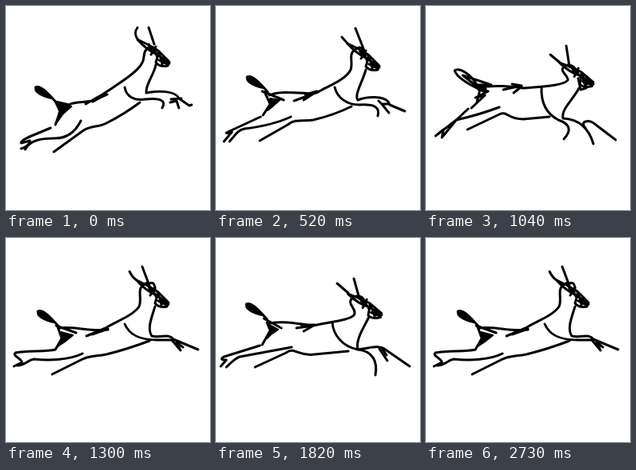
Recreate the animation shown at these times as an HTML page without scripts. Size 256 by 256 pixels, loop 2.86 s.

```html
<!DOCTYPE html>
<html lang="en">
<head>
<meta charset="utf-8">
<title>Leaping antelope</title>
<style>
  html, body { margin: 0; width: 100%; height: 100%; overflow: hidden; background: #fff; }
  svg { display: block; width: 100%; height: 100%; }
  .strip { fill: none; stroke: #000; stroke-width: 3; stroke-linecap: round; stroke-linejoin: round; }
  .solid { fill: #000; stroke-width: 2; }
</style>
</head>
<body>
<svg viewBox="0 0 256 256">
  <defs>
    <path id="head" d="M-23-18Q-12-5 2 1L17 12M-23-18Q-8-11 3-4L16 9M-9-12L-4-2M-6 1L0-9M-4-8L2 4 0 11Q5 17 15 15L17 10 6 5 8 13M3-2L8 9 14 13 4 8"/>
    <g id="tail">
      <path class="solid" d="M0 0C5-3 14 5 20 14C11 12-3 7 0 0Z"/>
      <path d="M0 0C5-3 14 5 26 19"/>
    </g>
  </defs>

  <!-- Poses sit side by side; the strip jumps to one at a time. -->
  <g class="strip">
    <animateTransform attributeName="transform" type="translate" dur="2.86s" repeatCount="indefinite" calcMode="discrete"
      values="-256;-1024;-1280;-1024;-768;-256;0;-768;-1536;-1280;-1024;-256;0;-768;-1280;-1024;-512;0;-512;-768;-1280;-1024"/>

    <!-- take-off -->
    <g>
      <use href="#head" x="187" y="60"/>
      <use href="#tail" x="38" y="98"/>
      <path d="M166 29C160 32 163 40 166 44M178 24L186 50M187 58Q186 50 180 50C170 55 175 64 172 69C167 80 144 92 124 104L95 118M62 116L80 120C88 113 108 112 118 106M105 115L122 105M103 116L118 108"/>
      <path class="solid" d="M64 119L79 122 71 131 64 141 66 130Z"/>
      <path d="M63 117L66 130 58 149C49 156 44 166 24 186M32 178L27 185M89 139C84 155 73 167 58 170C46 172 37 176 33 188M62 179L98 152C106 144 114 149 124 144Q148 131 168 116"/>
      <path d="M144 98C150 110 160 116 180 114L205 114M189 73C183 88 173 101 177 108C190 111 205 106 213 115L232 126Q237 126 235 123M203 116L215 128 204 121M210 116L216 122 222 134"/>
    </g>

    <!-- rising -->
    <g transform="translate(256)">
      <use href="#head" x="188" y="60"/>
      <use href="#tail" x="37" y="102"/>
      <path d="M165 27C160 34 163 39 166 43M179 27L186 48M188 58Q187 51 181 51C170 56 175 65 171 71C165 84 137 100 121 111L100 123M62 120L79 124C88 119 100 122 112 118L127 111M109 120L126 111 112 116"/>
      <path class="solid" d="M64 123L82 126 71 136 64 146 67 132Z"/>
      <path d="M63 122L68 132 62 149M56 153L32 163Q18 169 19 172L30 169Q29 176 19 179M94 144C87 158 76 166 62 166C45 166 30 168 24 180M60 183L96 157C107 149 115 153 126 147Q148 136 168 121"/>
      <path d="M149 102C151 114 161 119 175 117C192 115 202 118 196 128M188 74C185 88 175 98 176 109C190 106 213 106 217 116L230 125 233 124M206 121L214 119 217 128M220 116L207 117"/>
    </g>

    <!-- high stretch -->
    <g transform="translate(512)">
      <use href="#head" x="188" y="60"/>
      <use href="#tail" x="38" y="95"/>
      <path d="M164 29C158 32 163 39 166 44M178 26L187 55M188 58Q188 49 182 50C171 55 175 63 171 70C164 83 140 95 123 105L97 117M66 114C82 107 105 112 124 107M108 115L127 105 113 110M62 112L84 117"/>
      <path class="solid" d="M63 116L82 119 71 129 63 139 66 128Z"/>
      <path d="M66 128L58 143M54 144L16 162Q11 167 23 164L13 172M92 139C80 148 62 153 44 155C32 156 25 162 22 171M57 173L98 146C107 140 114 146 124 141Q148 129 170 117"/>
      <path d="M147 100C152 112 162 117 178 115L201 115M189 74C184 90 174 100 177 107C190 110 208 103 216 112L222 119 232 125Q238 125 235 122M202 121L203 116 218 128 206 120"/>
    </g>

    <!-- mid stretch -->
    <g transform="translate(768)">
      <use href="#head" x="188" y="65"/>
      <use href="#tail" x="39" y="89"/>
      <path d="M158 39L165 47M175 28L186 56M188 62Q186 52 180 52C163 58 173 68 169 80C163 92 144 99 128 108L98 119M67 112C80 106 100 109 123 110M110 118L127 107 112 111M58 107L85 118"/>
      <path class="solid" d="M68 116L80 118 71 126 65 131 68 123Z"/>
      <path d="M61 108L68 123 59 137M56 139L15 158Q9 161 20 158L10 170M94 139C75 148 52 152 36 154C26 156 24 163 17 170M55 169L90 149C100 141 109 145 122 143Q148 137 170 126"/>
      <path d="M149 102C152 115 164 124 180 124C199 123 206 127 203 138M188 80C184 95 173 112 178 118C190 113 210 113 216 120L218 124 237 132M204 119L208 123 217 134M208 123L216 123"/>
    </g>

    <!-- level stretch -->
    <g transform="translate(1024)">
      <use href="#head" x="187" y="71"/>
      <use href="#tail" x="40" y="92"/>
      <path d="M155 42Q159 50 164 53M171 36L180 60M178 58Q187 52 187 66M178 56C161 62 172 74 167 86C159 98 137 105 125 113L101 123M66 113C85 110 105 118 128 115M108 121L128 114 112 118M63 110L88 119"/>
      <path class="solid" d="M69 118L84 122 74 130 65 136 70 126Z"/>
      <path d="M65 112L70 126 62 140C50 143 28 141 12 144C7 148 20 151 20 156L10 161M96 145C80 153 55 154 35 152C25 154 26 159 14 160M58 171L92 154C104 147 112 149 126 146Q154 139 180 129"/>
      <path d="M149 108C155 122 168 128 190 128L211 128M187 86C182 102 177 114 183 123C195 126 204 119 210 127L241 140M208 128L219 141 214 131 222 137"/>
    </g>

    <!-- descending -->
    <g transform="translate(1280)">
      <use href="#head" x="190" y="86" transform="rotate(-5 190 86)"/>
      <use href="#tail" x="38" y="83"/>
      <path d="M152 57L166 69M173 51L180 76M187 81Q185 72 176 73C158 80 179 89 173 97C167 103 145 105 122 110M67 107C85 104 100 107 122 110L101 113M110 117L124 109 107 109M60 101L82 113"/>
      <path class="solid" d="M67 109L78 115 69 121 64 126 68 116Z"/>
      <path d="M64 106L68 116 58 134M55 135L10 149Q3 153 13 153L6 161M95 137L30 149Q25 150 13 162M49 162L88 144C99 136 102 149 124 146L166 142"/>
      <path d="M146 106C147 121 158 136 178 140C197 142 203 155 200 172M192 99C184 115 175 128 178 140C195 138 205 133 214 141L243 161M205 139L215 154M208 138L214 147"/>
    </g>

    <!-- landing -->
    <g transform="translate(1536)">
      <use href="#head" x="192" y="87" transform="rotate(-5 192 87)"/>
      <path d="M156 61L168 71M176 50L180 76M190 84Q187 74 178 74C162 80 179 86 178 93C173 100 145 101 122 103C105 101 90 99 64 102M97 105L120 100 108 98M110 109L120 101M191 91L194 105 201 103 197 92 210 98"/>
      <path d="M64 99C55 84 41 77 36 81C38 89 51 97 72 107L46 87 82 99 60 99 75 104M66 105L78 107 62 115 74 112 57 128M68 104L64 120"/>
      <path d="M53 129L38 143 12 163 22 155 20 165 38 143Q65 137 92 127M52 155L92 136C102 131 102 142 122 142L155 139"/>
      <path d="M145 102C144 122 151 135 166 143C181 148 183 156 173 167M192 103C185 117 169 130 172 141C190 142 204 152 210 173M200 153C192 145 204 141 213 149L238 168"/>
    </g>
  </g>
</svg>
</body>
</html>
```
